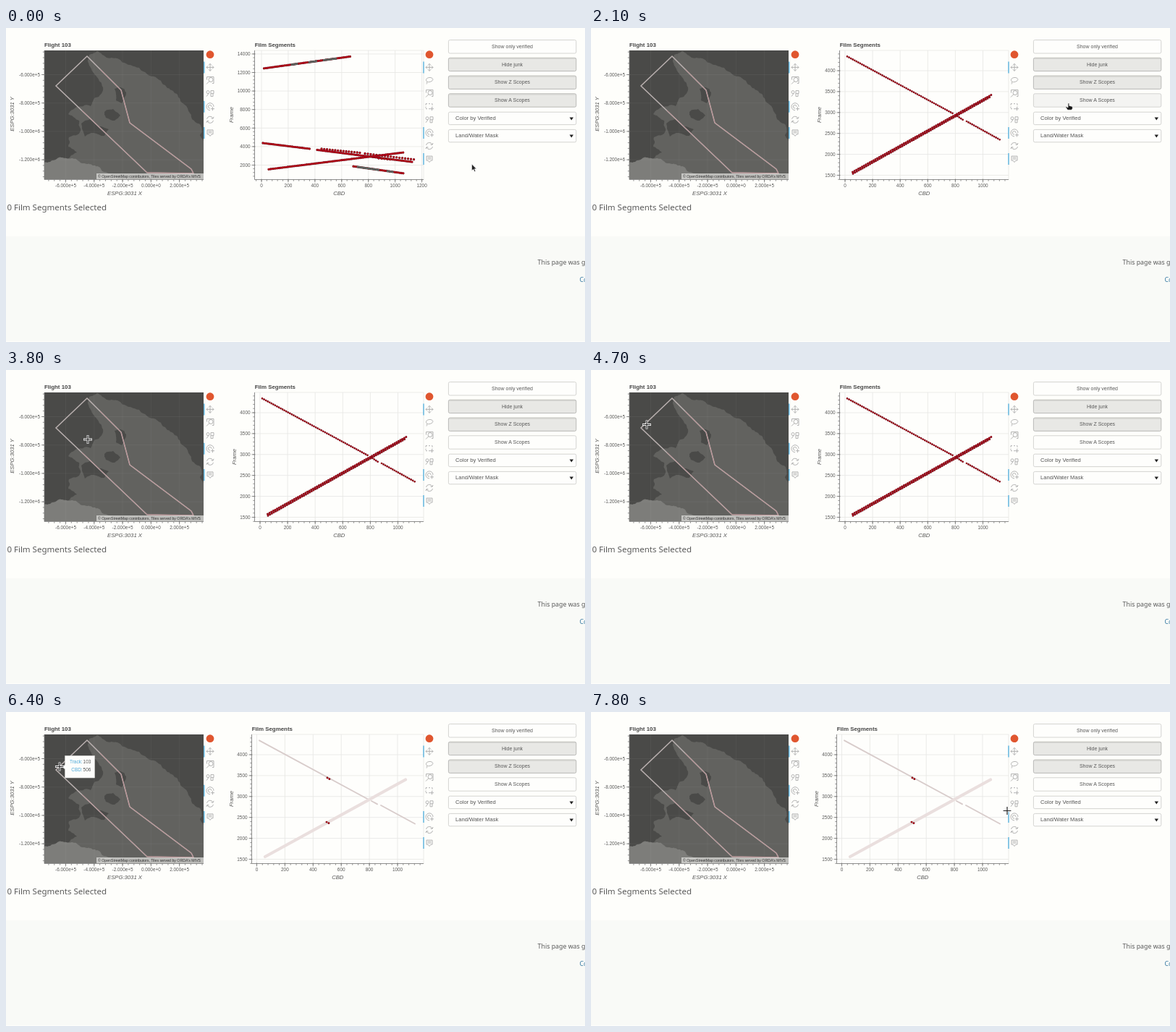
Write an HTML page that moves like this. It is 800 px wide and 434 px high and loops after 8 s.

```html
<!DOCTYPE html>
<html lang="en">
<head>
<meta charset="utf-8">
<title>Film segments</title>
<style>
html, body { margin: 0; width: 100%; height: 100%; overflow: hidden; background: #fefefb; }
svg { display: block; width: 800px; height: 434px; font: 6.4px "Liberation Sans", Arial, sans-serif; fill: #5a5a5a; }
.page { font-family: "Noto Sans", sans-serif; }
.title { font-size: 7.9px; font-weight: bold; fill: #444; }
.name { font-size: 7.7px; font-style: italic; fill: #555; text-anchor: middle; }
.icon { fill: none; stroke: #acacac; stroke-width: .9; }
</style>
</head>
<body>
<svg id="stage" viewBox="0 0 800 434"></svg>
<script>
const text = (x, y, s, attrs = '') => `<text x="${x}" y="${y}" ${attrs}>${s}</text>`;
const rect = (x, y, w, h, attrs) => `<rect x="${x}" y="${y}" width="${w}" height="${h}" ${attrs}/>`;
const path = (d, attrs) => `<path d="${d}" ${attrs}/>`;

// Axes with major and minor ticks, labels and grid; x and y are [first, step, labels].
function axes([l, t, r, b], x, y, grid) {
  let lines = `M${l} ${t}V${b}H${r}`, mesh = '', out = '';
  x[2].forEach((s, i) => {
    const p = x[0] + i * x[1];
    mesh += `M${p} ${t}V${b}`;
    lines += `M${p} ${b - 1}v5`;
    out += text(p, b + 10.5, s, 'text-anchor="middle"');
  });
  y[2].forEach((s, i) => {
    const p = y[0] + i * y[1];
    mesh += `M${l} ${p}H${r}`;
    lines += `M${l + 1} ${p}h-5`;
    out += text(l - 6, p + 2.2, s, 'text-anchor="end"');
  });
  for (let k = -8; k < 80; k++) {
    const p = x[0] + k * x[1] / 5, q = y[0] + k * y[1] / 5;
    if (p > l && p < r) lines += `M${p} ${b}v2.2`;
    if (q > t && q < b) lines += `M${l} ${q}h-2.2`;
  }
  return path(mesh, `stroke="${grid}" stroke-width=".8"`) +
    path(lines, 'fill="none" stroke="#777" stroke-width=".8"') + out;
}

// Chain of round markers between two points.
function chain(x1, y1, x2, y2, pitch = 2.4, size = 3.3, core = '#b80518', rim = '#5c1018') {
  const d = `M${x1} ${y1}L${x2} ${y2}`;
  const dots = (c, w) => path(d, `stroke="${c}" stroke-width="${w}" stroke-linecap="round" stroke-dasharray="0 ${pitch}"`);
  return dots(rim, size) + dots(core, size - .8);
}
const faint = (x1, y1, x2, y2, w, c) => path(`M${x1} ${y1}L${x2} ${y2}`, `stroke="${c}" stroke-width="${w}" stroke-linecap="round"`);

function scatter(id, left, nameX, x, y, data) {
  return `<g id="${id}">` + text(left + .3, 26, 'Film Segments', 'class="title"') +
    rect(left, 31, 577 - left, 178.5, 'fill="#fefefc" stroke="#e6e6e4" stroke-width=".8"') +
    axes([left, 31, 577, 209.5], x, y, '#e6e6e4') +
    text((left + 577) / 2, 230.5, 'CBD', 'class="name"') +
    `<g transform="translate(${nameX} 120) rotate(-90)">${text(0, 0, 'Frame', 'class="name"')}</g>` + data + '</g>';
}

const count = (from, step, n) => Array.from({ length: n }, (_, i) => from + step * i);
const allData = () => {
  const dark = (...p) => chain(...p, 2.4, 3, '#66716c', '#454b48');
  return chain(356.5, 55.8, 477, 39.2) + dark(395, 50.5, 404, 49.3) + dark(419, 47.2, 429, 45.8) + dark(439, 44.4, 456, 42.1) +
    chain(355, 159, 420, 167) + chain(430, 168.5, 562, 185.2) + chain(436, 167, 490, 172.5, 3.8) +
    chain(496, 173.5, 566, 182, 4) + chain(515, 180, 532, 181.8, 4) + chain(363, 195.3, 549, 172) +
    chain(480, 191.2, 550, 201) + dark(486, 192, 515, 196.1) + dark(527, 197.8, 536, 199);
};
const crossData = chain(354, 39.3, 501, 118.6, 2.9, 2.7) + chain(504, 120.3, 514, 127, 2.9, 2.7) + chain(519, 129, 566, 155, 2.9, 2.7) +
  chain(362, 201.2, 553, 94.5, 3, 3) + chain(361.5, 199, 553, 92.4, 3, 3);
const pickedData = faint(350, 39.3, 501, 121, 1.9, '#d8cccb') + faint(505, 123, 513, 127.4, 1.9, '#d8cccb') +
  faint(518, 129, 565, 154.5, 1.9, '#d8cccb') + faint(358, 200, 552, 93.5, 4.2, '#eadfde') +
  chain(444, 91, 447.5, 93, 3.3, 2.9) + chain(443, 152.1, 446, 153.7, 3.3, 2.9);

// Coastlines are a few points roughened by seeded midpoint shifts.
let seed = 7;
const random = () => (seed = seed * 16807 % 2147483647) / 2147483647 - .5;
function coast(points, depth, fill) {
  let p = points.split(' ').map(s => s.split(',').map(Number));
  for (; depth--;) p = p.flatMap((a, i) => {
    const b = p[(i + 1) % p.length], j = Math.hypot(a[0] - b[0], a[1] - b[1]) * .28;
    return [a, [(a[0] + b[0]) / 2 + random() * j, (a[1] + b[1]) / 2 + random() * j]];
  });
  return path('M' + p.map(q => q.map(v => v.toFixed(1))).join('L') + 'Z', `fill="${fill}"`);
}

const sea = '#4a4a48', land = '#62625f';
const sci = (v, e) => `${v.toFixed(3)}e+${e}`;
function map() {
  const track = 'M112 39L69 80L195 200L259 201L256 195L171 131L159 86Z';
  return text(53, 26, 'Flight 103', 'class="title"') +
    '<clipPath id="view"><rect x="53" y="31" width="220" height="178"/></clipPath><g clip-path="url(#view)">' +
    rect(53, 31, 220, 178, `fill="${sea}"`) +
    coast('115,37 126,32 139,41 154,42 170,51 184,55 199,66 216,77 231,87 241,101 251,111 257,126 269,134 268,149 275,158 275,212 100,212 84,184 98,172 86,164 87,151 103,142 101,128 86,119 96,110 117,108 124,96 134,86 131,75 120,61 113,46', 3, land) +
    coast('150,84 158,82 166,89 160,104 152,100', 2, sea) +
    coast('136,116 148,112 158,121 150,128 138,124', 2, sea) +
    coast('104,132 116,126 128,136 142,140 136,149 121,145 109,150', 2, sea) +
    coast('50,186 64,183 78,179 92,180 105,187 120,190 133,198 150,204 158,212 50,212', 3, '#7d7d7a') +
    path('M82.5 31V209M121.8 31V209M161 31V209M200.3 31V209M239.6 31V209M53 64.5H273M53 103.7H273M53 142.9H273M53 182.1H273', 'stroke="#fff" stroke-opacity=".06" stroke-width=".8"') +
    path(track, 'fill="none" stroke="#b9b0af" stroke-width="1.5"') +
    path('M130 57L159 86L171 131L256 195L259 201L195 200L105 114', 'fill="none" stroke="#c08f93" stroke-width=".9"') +
    rect(125, 201, 148, 8, 'fill="#e5e5e3" fill-opacity=".7"') +
    text(127, 206.8, "© OpenStreetMap contributors, Tiles served by ORDA's MIVS", 'font-size="5.2" fill="#333"') + '</g>' +
    axes([53, 31, 273, 209.5], [82.5, 39.28, [sci(-6, 5), sci(-4, 5), sci(-2, 5), sci(0, 0), sci(2, 5)]],
      [64.5, 39.2, [sci(-6, 5), sci(-8, 5), sci(-1, 6), sci(-1.2, 6)]], 'none') +
    text(164, 230.5, 'ESPG:3031 X', 'class="name"') +
    `<g transform="translate(11 119) rotate(-90)">${text(0, 0, 'ESPG:3031 Y', 'class="name"')}</g>`;
}

const icons = {
  pan: 'M-5 0H5M0-5V5M-3-2L-5 0L-3 2M3-2L5 0L3 2M-2-3L0-5L2-3M-2 3L0 5L2 3',
  lasso: 'M-3 2C-8-2 0-6 4-3C7 0 1 3-3 2C-5 3-2 4-4 5',
  zoom: 'M-4.5-1V-5H5V4H3M4-1A3 3 0 1 1-2-1A3 3 0 1 1 4-1M-1 1L-5 5',
  select: 'M-5-4h2m2 0h2m2 0h1v2m0 2v1M-5-4v2m0 2v2m0 1h2m2 0h2M1 3h5M3.5.5v5',
  wheel: 'M-1-2A2 2 0 1 1-5-2A2 2 0 1 1-1-2M-2 0L-5 4M1-4h4v4h-4zM1 0v4h3v-4',
  tap: 'M5 0A5 5 0 1 0 0 5M2 0A2.3 2.3 0 1 0 0 2.3M1 3h5M3.5.5v5',
  reset: 'M-4.5-1A4.5 4.5 0 0 1 4-2M4.5 1A4.5 4.5 0 0 1-4 2M5-4L4-1.5L1.5-2M-5 4L-4 1.5L-1.5 2',
  hover: 'M-4-4H4V2H2L0 4.5L-2 2H-4ZM-2.5-2h5M-2.5 0h5'
};
const toolbar = (x, edge, names, active) => `<circle cx="${x}" cy="36.7" r="5.4" fill="#e0562f"/>` +
  names.map((n, i) => {
    const y = 54.4 + i * 18.1;
    return path(icons[n], `class="icon" transform="translate(${x} ${y})"`) +
      (active.includes(n) ? path(`M${edge} ${y - 8}v16`, 'stroke="#5ab4e0" stroke-width="1.4"') : '');
  }).join('');

const button = (y, s, on, id = '') => `<g id="${id}">` +
  rect(611.4, y, 176.4, 18.4, `rx="2" fill="${on ? '#e8e8e5' : '#fefefc'}" stroke="${on ? '#b4b4b1' : '#d0d0cd'}" stroke-width=".9"`) +
  (on ? path(`M612 ${y + 1.1}h175`, 'stroke="#d3d3d0" stroke-width="1.4"') : '') +
  text(699.5, y + 11.4, s, 'font-size="7.02" text-anchor="middle"') + '</g>';
const dropdown = (y, s) => rect(611.4, y, 176.4, 17.4, 'rx="2" fill="#fefefc" stroke="#d0d0cd" stroke-width=".9"') +
  text(621, y + 11, s, 'font-size="7.6" fill="#555"') + path(`M778.6 ${y + 7.2}h5.4l-2.7 4z`, 'fill="#222"');

const hundreds = count(0, 200, 7), frames = count(1500, 500, 6);
stage.innerHTML = rect(0, 0, 800, 434, 'fill="#fefefb"') + rect(0, 288, 800, 145, 'fill="#f9faf7"') + map() +
  scatter('all', 343.5, 314, [353, 36.93, hundreds], [189.5, -25.6, count(2000, 2000, 7)], allData()) +
  scatter('cross', 343.5, 318, [351, 38.1, hundreds.slice(0, 6)], [203.5, -28.9, frames], crossData) +
  scatter('picked', 339.5, 314, [346.5, 38.9, hundreds.slice(0, 6)], [203.5, -28.9, frames], pickedData) +
  toolbar(282, 273.8, ['pan', 'zoom', 'wheel', 'tap', 'reset', 'hover'], ['pan', 'tap', 'hover']) +
  toolbar(585, 577, ['pan', 'lasso', 'zoom', 'select', 'wheel', 'tap', 'reset', 'hover'], ['pan', 'tap', 'hover']) +
  button(16.6, 'Show only verified') + button(41.2, 'Hide junk', true) + button(66, 'Show Z Scopes', true) +
  button(90.8, 'Show A Scopes', false, 'off') + button(90.8, 'Show A Scopes', true, 'on') +
  rect(611.8, 91.2, 175.6, 17.6, 'id="glow" fill="#000" fill-opacity=".04"') +
  dropdown(116.2, 'Color by Verified') + dropdown(140.4, 'Land/Water Mask') +
  text(1.4, 252, '0 Film Segments Selected', 'class="page" font-size="11.5"') +
  text(734.6, 327, 'This page was generated', 'class="page" font-size="8.8"') +
  text(792.5, 350.5, 'Code', 'class="page" font-size="8.8" fill="#3a7ca5"') +
  '<g id="tip">' + path('M81.5 60.5H122.5V91H81.5V79L78 76L81.5 73Z', 'fill="#fdfdfb" stroke="#d5d5d2" stroke-width=".6"') +
  text(105.6, 71.2, 'Track:', 'text-anchor="end" fill="#4aa8d8"') + text(106.6, 71.2, '103') +
  text(105.6, 82.2, 'CBD:', 'text-anchor="end" fill="#4aa8d8"') + text(106.6, 82.2, '506') + '</g><g id="pointer">' +
  path('M0 0V9.2L2.2 7.3L3.8 10.6L5.3 9.9L3.8 6.8H6.6Z', 'id="arrow" fill="#222" stroke="#fff" stroke-width=".6"') +
  path('M-.9 0H.7V3.4L5 4.6L5.4 7L4 9.2H-1.4L-4 5.6L-3.4 4.8L-.9 6Z', 'id="hand" fill="#151515" stroke="#fff" stroke-width=".5"') +
  '<g id="plus">' + path('M-6 0H6M0-6V6', 'stroke="#fff" stroke-width="2.8"') +
  path('M-5.4 0H5.4M0-5.4V5.4', 'stroke="#222" stroke-width="1.2"') + '</g></g>';

// Pointer stops: time, x, y, shape.
const stops = [
  [0, 643.5, 188, 'arrow'], [800, 649, 166, 'arrow'], [900, 657, 128, 'arrow'], [1000, 660, 106, 'hand'],
  [1500, 660, 104, 'hand'], [2400, 660, 105, 'hand'],
  [2600, 659, 108, 'hand'], [2700, 656, 114, 'arrow'], [2800, 652, 121, 'arrow'], [2900, 648, 127, 'arrow'],
  [3100, 634, 134, 'arrow'], [3200, 614, 137, 'arrow'], [3300, 594, 134, 'arrow'],
  [3500, 435, 135, 'plus'], [3700, 190, 114, 'plus'], [3800, 113, 96, 'plus'], [3900, 104, 91, 'plus'],
  [4000, 98, 87, 'plus'], [4100, 93, 84, 'plus'], [4200, 88, 81, 'plus'], [4300, 84, 78, 'plus'],
  [4400, 81, 76, 'plus'], [4500, 79, 75, 'plus'], [4600, 78, 76, 'plus'], [4700, 77, 75.5, 'plus'],
  [4800, 75, 75.5, 'plus'], [4900, 74, 75.5, 'plus'], [7100, 86, 83, 'plus'],
  [7300, 118, 94, 'plus'], [7400, 180, 110, 'plus'], [7500, 260, 122, 'plus'],
  [7700, 460, 133, 'plus'], [7800, 575, 136.5, 'plus']
];
const el = id => document.getElementById(id);
const show = (id, on) => el(id).style.display = on ? '' : 'none';

function draw(now) {
  const t = now % 8000;
  const [, x, y, shape] = stops.findLast(s => s[0] <= t);
  el('pointer').setAttribute('transform', `translate(${x} ${y})`);
  ['arrow', 'hand', 'plus'].forEach(id => show(id, id === shape));
  show('all', t < 2100);
  show('cross', t >= 2100 && t < 6400);
  show('picked', t >= 6400);
  show('on', t < 2100);
  show('off', t >= 2100);
  show('glow', t >= 2100 && t < 2800);
  show('tip', t >= 5500 && t < 7100);
  requestAnimationFrame(draw);
}
draw(performance.now());
</script>
</body>
</html>
```
